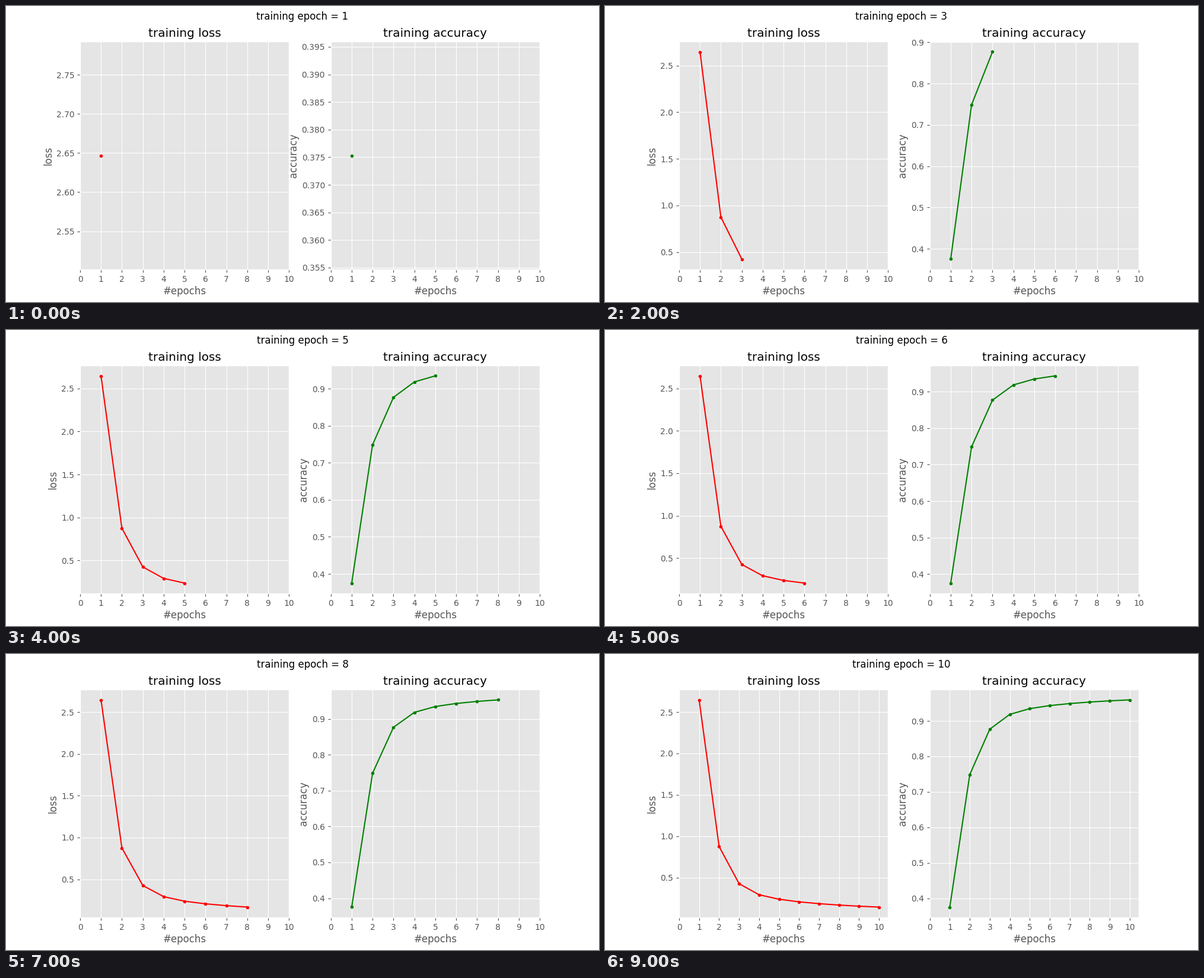
A matplotlib script that plays this animation: 1000 px wide and 500 px high, repeating every 10000 ms.

```python
import matplotlib.pyplot as plt
import numpy as np
from matplotlib.animation import FuncAnimation

EPOCHS = 10
LABEL_PAD = 3.28  # points between tick labels and axis label

plt.style.use("ggplot")
plt.rcParams["font.family"] = "DejaVu Sans"

fig, (loss_ax, acc_ax) = plt.subplots(1, 2, figsize=(10, 5), dpi=100)


def decay(fast, rate, slow, floor, bend=1.0):
    """A steep early drop plus a slow tail, settling on the floor."""
    step = np.arange(EPOCHS)
    return fast * np.exp(-rate * step**bend) + slow * 0.8**step + floor


loss = decay(fast=2.2268, rate=1.457, slow=0.32, floor=0.1)
accuracy = 1 - decay(fast=0.51468, rate=1.186, slow=0.08, floor=0.03, bend=1.078)


def draw_curve(ax, values, name, style):
    """Plot the values so far; the y axis rescales to fit them."""
    n = len(values)
    ax.clear()
    ax.plot(range(1, n + 1), values, style)
    ax.set_title(f"training {name}")
    ax.set_xlabel("#epochs", labelpad=LABEL_PAD)
    ax.set_ylabel(name, labelpad=LABEL_PAD)
    ax.set_xticks(range(EPOCHS + 1))
    # The right edge keeps a 5% margin once the data needs it.
    ax.set_xlim(0, max(EPOCHS, n + 0.05 * (n - 1)))


def update(frame):
    epoch = frame + 1
    fig.suptitle(f"training epoch = {epoch}", y=0.982)
    draw_curve(loss_ax, loss[:epoch], "loss", "r.-")
    draw_curve(acc_ax, accuracy[:epoch], "accuracy", "g.-")
    return []


anim = FuncAnimation(fig, update, frames=EPOCHS, init_func=lambda: update(0),
                     interval=1000, repeat=True, repeat_delay=0, blit=False)
plt.show()
```
